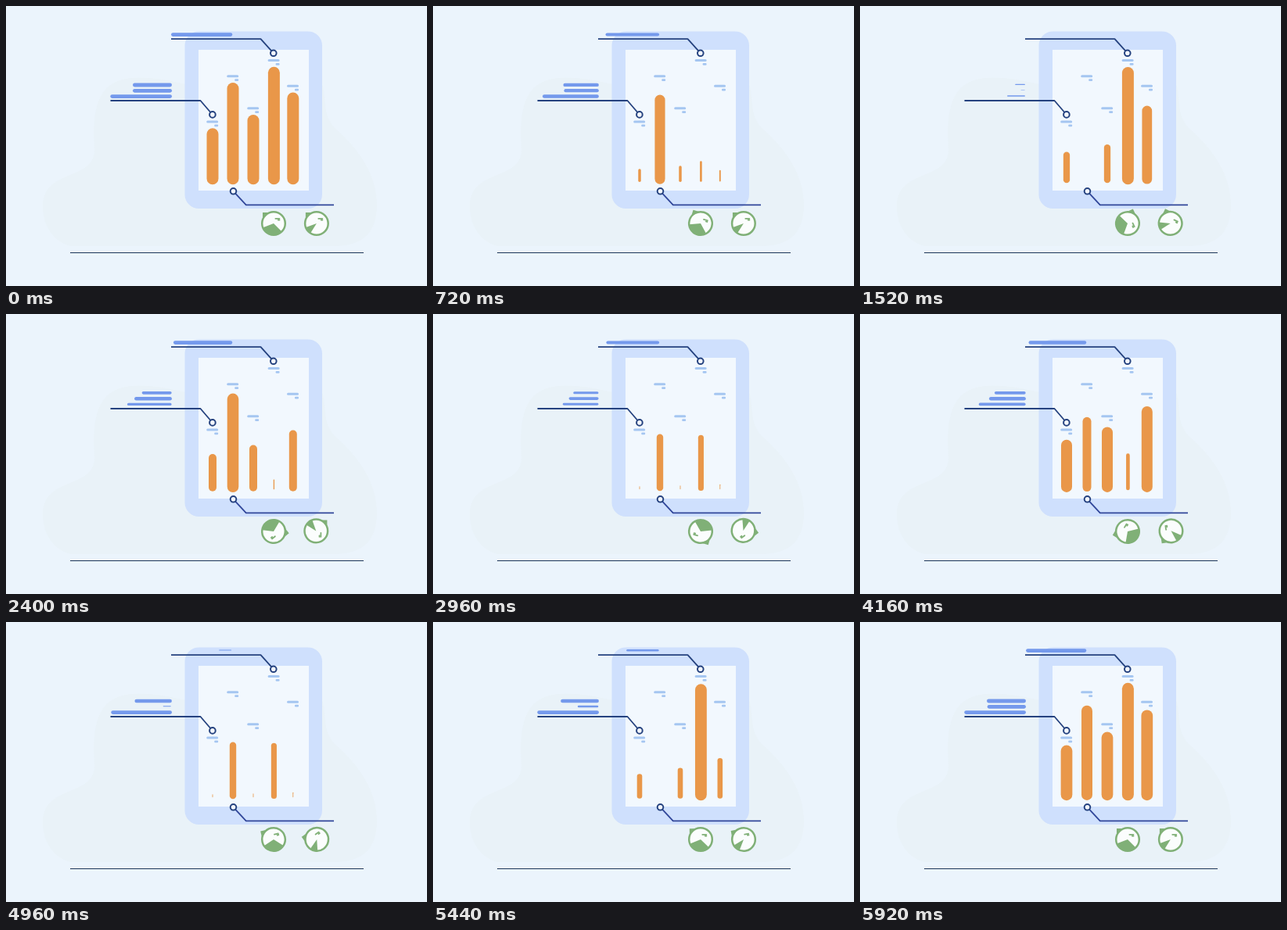
Write an HTML page with a canvas that moves like this. It is 538 by 358 pixels and loops after 6 s.

```html
<!DOCTYPE html>
<html lang="en">
<head>
<meta charset="utf-8">
<title>Chart tablet</title>
<style>
html, body { margin: 0; width: 100%; height: 100%; overflow: hidden; background: #ebf4fc; }
canvas { display: block; }
</style>
</head>
<body>
<canvas id="stage" width="538" height="358"></canvas>
<script>
const ctx = document.getElementById('stage').getContext('2d');
const LOOP = 6000, STEP = 80, BEAT = 1000, BASE = 224;
const NAVY = '#25427f', BLUE = '#7499ec', PALE = '#a5c6f1', ORANGE = '#e99749', GREEN = '#80b077';

// lag shifts the pulse, low is the smallest size, rush speeds up the first pulse.
const bars = [
  { x: 264, top: 156.3, lag: 0, low: 0.05 },
  { x: 290, top: 98, lag: 500, low: 0 },
  { x: 316, top: 139, lag: 0, low: 0.05 },
  { x: 342.4, top: 77.8, lag: -500, low: 0.06 },
  { x: 366.8, top: 110.5, lag: 0, low: 0.05, rush: 1.15 }
];
// dips: how far a line shrinks at each of three even beats; mid: spread of the second.
const lines = [
  { x: 162, r: 212, y: 101, dips: [0.74, 0.38, 0.04], mid: 1900 },
  { x: 162, r: 212, y: 108.3, dips: [0.9, 0.3, 0.8], mid: 1000 },
  { x: 133.3, r: 212, y: 115.6, dips: [0.7, 0.45, 0], mid: 1900 },
  { x: 211, r: 289.3, y: 36.6, dips: [1, 0.17, 0.8], mid: 1000 }
];
const pies = [
  { x: 342, y: 278, off: 0, from: 135, to: 249, start: 0, end: 5600 },
  { x: 396.9, y: 277.4, off: 0.6, from: 212, to: 250, start: 650, end: 6000 }
];

function ease(u) {
  u = Math.min(1, Math.max(0, u));
  return u * u * (3 - 2 * u);
}

// A shifted pulse waits at one end of the loop and catches up at the other.
function shift(t, lag) {
  const u = Math.min(LOOP, Math.max(0, t - lag));
  return lag > 0 ? u + Math.max(0, t - LOOP + lag) : u - Math.max(0, -lag - t);
}

function barSize({ lag, low, rush = 1 }, t) {
  let u = shift(t, lag);
  if (u < 2 * BEAT) u = Math.min(2 * BEAT, u * rush);
  return low + (1 - low) * ease(Math.abs(1 - (u / BEAT) % 2));
}

function lineSize({ dips, mid }, t) {
  return dips.reduce((size, depth, i) => {
    const spread = i === 1 ? mid : 1000;
    return size - depth * ease(1 - Math.abs(t - 1500 - 1750 * i) / spread);
  }, 1);
}

function box(x, y, w, h, r, color) {
  ctx.fillStyle = color;
  ctx.beginPath();
  ctx.roundRect(x, y, w, h, r);
  ctx.fill();
}

function stroke(points, color, width) {
  ctx.strokeStyle = color;
  ctx.lineWidth = width;
  ctx.lineJoin = 'round';
  ctx.beginPath();
  points.forEach(([x, y]) => ctx.lineTo(x, y));
  ctx.stroke();
}

function disc(x, y, r, fill, edge, width) {
  ctx.beginPath();
  ctx.arc(x, y, r, 0, Math.PI * 2);
  ctx.fillStyle = fill;
  ctx.fill();
  ctx.strokeStyle = edge;
  ctx.lineWidth = width;
  ctx.stroke();
}

// A level line with a diagonal end that runs into a ring.
function pointer(x, y, bend, cx, cy, color = NAVY) {
  const d = Math.hypot(cx - bend, cy - y), k = 1 - 3.5 / d;
  stroke([[x, y], [bend, y], [bend + (cx - bend) * k, y + (cy - y) * k]], color, 1.8);
  disc(cx, cy, 3.8, '#f4f8fe', NAVY, 2);
}

function scaled(ox, oy, s, draw) {
  if (s < 0.015) return;
  ctx.save();
  ctx.translate(ox, oy);
  ctx.scale(s, s);
  ctx.translate(-ox, -oy);
  draw();
  ctx.restore();
}

function blob() {
  ctx.fillStyle = '#e9f2f8';
  ctx.beginPath();
  ctx.moveTo(82, 307);
  ctx.bezierCurveTo(58, 300, 47, 278, 47, 256);
  ctx.bezierCurveTo(48, 207, 113, 224, 113, 184);
  ctx.bezierCurveTo(112, 160, 110, 128, 126, 108);
  ctx.bezierCurveTo(146, 84, 190, 91, 229, 100);
  ctx.lineTo(404, 100);
  ctx.bezierCurveTo(410, 120, 404, 138, 420, 156);
  ctx.bezierCurveTo(450, 182, 474, 215, 474, 255);
  ctx.bezierCurveTo(474, 290, 455, 307, 420, 307);
  ctx.fill();
}

function pie(p, t) {
  const rad = Math.PI / 180;
  ctx.save();
  ctx.translate(p.x, p.y);
  ctx.rotate(Math.PI * 2 * ease((t - p.start) / (p.end - p.start)));
  ctx.translate(0, p.off);
  ctx.fillStyle = GREEN;
  ctx.beginPath();
  ctx.moveTo(-14, -14);
  ctx.lineTo(-5, -14);
  ctx.lineTo(-14, -5);
  ctx.fill();
  disc(0, 0, 14.8, '#fbfdfd', GREEN, 2.5);
  ctx.fillStyle = GREEN;
  ctx.beginPath();
  ctx.moveTo(0, 0);
  ctx.arc(0, 0, 14.5, (p.from - 90) * rad, (p.to - 90) * rad);
  ctx.fill();
  box(1.5, -7, 6.8, 1.8, 0.8, GREEN);
  box(5, -5.4, 3.3, 2, 0.7, GREEN);
  ctx.restore();
}

function bar(b, t) {
  const x = b.x - 7.8, y = b.top - 8.2;
  box(x, y - 1.5, 15, 3, 1.5, PALE);
  box(x + 10, y + 3.4, 5, 2.8, 1.2, PALE);
  scaled(b.x, BASE, barSize(b, t), () =>
    box(b.x - 7.5, b.top, 15, 228.2 - b.top, 7.5, ORANGE));
}

function render(t) {
  ctx.fillStyle = '#ebf4fc';
  ctx.fillRect(0, 0, 538, 358);
  blob();
  stroke([[82, 315.5], [457, 315.5]], '#1d3557', 1.2);
  box(228.5, 32.5, 175.5, 226.5, 18, '#cfe0fd');
  box(246, 56, 141, 180, 0, '#f2f8fe');

  bars.forEach(b => bar(b, t));
  for (const l of lines) {
    scaled(l.r - 1.5, l.y - 0.8, lineSize(l, t), () =>
      box(l.x, l.y - 2.4, l.r - l.x, 4.8, 2.4, BLUE));
  }
  pointer(211, 42.2, 325.5, 341.8, 60.3);
  pointer(133.5, 121, 248.5, 263.9, 138.9);
  pointer(419, 254.4, 306.8, 290.5, 236.8, '#31479a');
  pies.forEach(p => pie(p, t));
}

function tick() {
  const t = performance.now() % LOOP;
  render(Math.floor(t / STEP) * STEP);
  requestAnimationFrame(tick);
}
tick();
</script>
</body>
</html>
```
